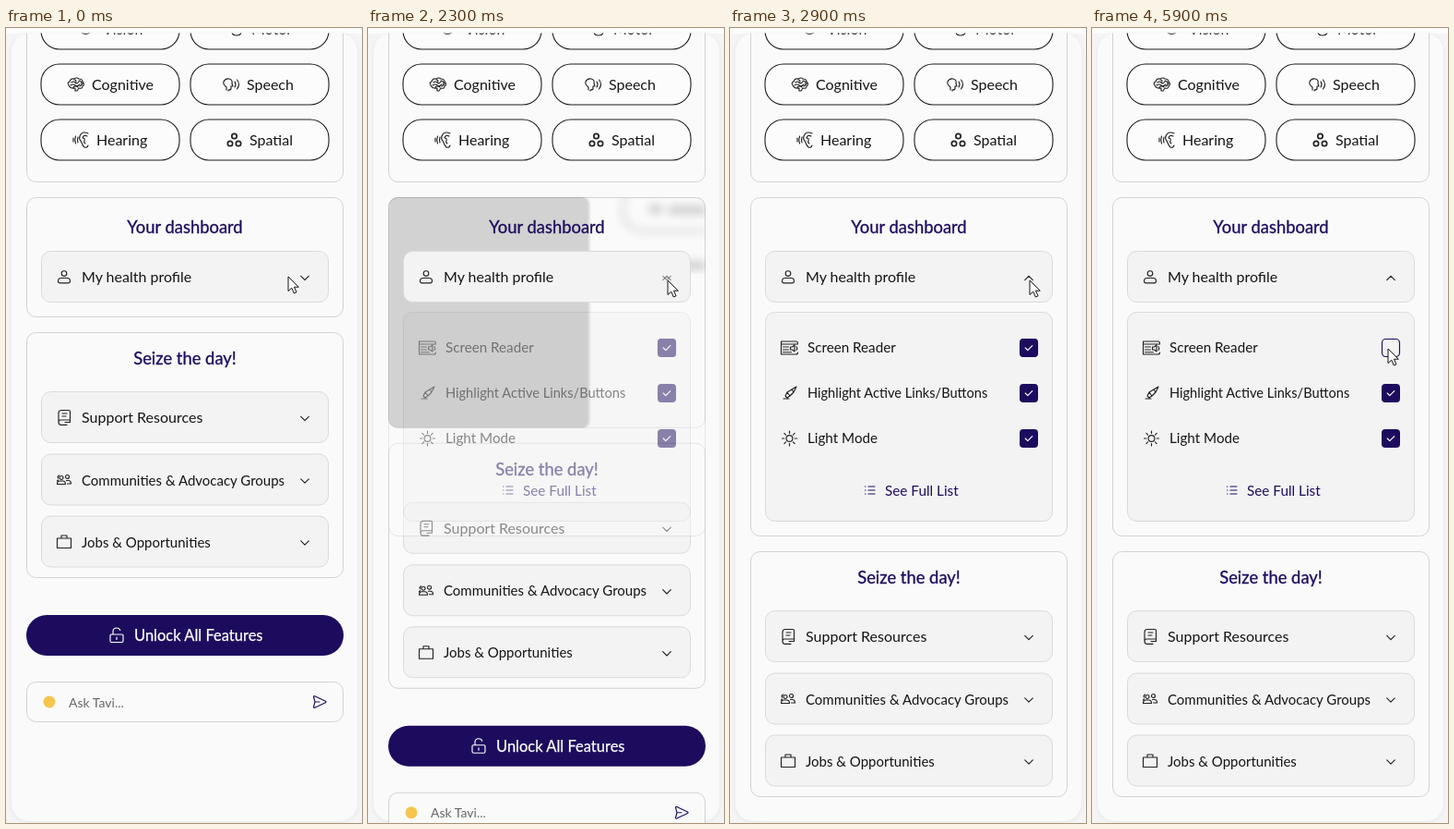
An HTML page that plays this animation: 386 by 860 pixels, repeating every 6 s.

```html
<!DOCTYPE html>
<html lang="en">
<head>
<meta charset="utf-8">
<title>Accessibility dashboard</title>
<style>
  html, body { margin: 0; width: 100%; height: 100%; overflow: hidden; background: #f5f5f5; }
  svg { display: block; font: 16px Lato, "Open Sans", sans-serif; fill: #151515; }
  .panel { fill: #fafafa; stroke: #d2d2d4; }
  .row { fill: #f3f3f3; stroke: #dadadc; }
  .pill { fill: #fcfcfc; stroke: #1c1c1c; stroke-width: 1.1; }
  .line { fill: none; stroke: #222; stroke-width: 1.15; stroke-linecap: round; stroke-linejoin: round; }
  .navy { stroke: #1d0c5e; }
  .white { stroke: #fff; }
  .title { font-size: 18.4px; text-anchor: middle; fill: #1d0c5e; stroke: #1d0c5e; stroke-width: .3; }
  .box { fill: #1d0c5e; }
  .cursor { fill: #fff; stroke: #111; stroke-width: 1; stroke-linejoin: round; }
</style>
</head>
<body>
<svg id="stage" width="386" height="860" viewBox="0 0 386 860"></svg>
<script>
const icons = {
  brain: 'M-8 1q-2-3 1-4q1-4 5-3q3-2 5 0q4 0 4 3q3 3 0 5q0 3-4 2l-2 3h-2v-3q-5 1-7-3zM-5-2q2-2 4 0t4-1M-6 1q3-2 5 0t5-1M-2-5q2 0 2 2M3-4q3 0 3 3M-3 3q2-2 5 0M4 2q2-1 3-3',
  speech: 'M-5 6v-3q-4-3-3-6q2-4 6-3q4 1 3 5l1 3h-2v3q-1 1-3 1v1M4-3q2 3 0 6M6.5-5q4 5 0 10',
  ear: 'M-8-2v4M-5.5-4q-1.5 4 0 8M-3-3q-1 3 0 6M8-7q-7-3-9 3q-1 3 1 5q2 5 4 7q3 1 4-2M7-4q-4-2-5 2q3 0 2 3q-1 2 1 3',
  user: 'M-2.8-4a2.8 2.8 0 1 0 5.6 0a2.8 2.8 0 1 0-5.6 0M-6.5 4.2q0-3.2 3.2-3.2h6.6q3.2 0 3.2 3.2q0 2.2-2.2 2.2h-8.6q-2.2 0-2.2-2.2z',
  doc: 'M-6 5V-5q0-3 3-3H5q1.5 0 1.5 1.5V2.5H-4q-2 0-2 2.5t2 2.8H3M6.5 2.5v2M-2-4.5h5M-2-1.5h4M1 5h5.5',
  group: 'M-5-2.5a2 2 0 1 0 4 0a2 2 0 1 0-4 0M1.5-3.5a2 2 0 1 0 4 0a2 2 0 1 0-4 0M-7.5 4.5q0-3.5 3-3.5h3q3 0 3 3.5zM2.5.5h2q3 0 3 3.5h-4M-5.5-5q-2 1-1 3M-7.5 1l1-1',
  bag: 'M-7.5-4h15v10.5h-15zM-3-4v-3h6v3',
  lock: 'M-6-1h12q1 0 1 1v6q0 1.5-1.5 1.5h-11q-1.5 0-1.5-1.5v-6q0-1 1-1M-4-1v-3q0-4 4-4q3 0 3.8 2.5M0 2v2.5',
  send: 'M-6.5-5.5q0-1.3 1.3-.8L6.5-.8q1 .8 0 1.6L-5.2 6.3q-1.3.5-1.3-.8L-5 0zM-5 0h5',
  down: 'M-4.3-2.1L0 2.2L4.3-2.1',
  up: 'M-4.3 2.1L0-2.2L4.3 2.1',
  reader: 'M-9-7H7q2 0 2 2M-9-7V7H7q2 0 2-2M-9-4H9M-7-1h6M-7 2h6M-7 4.7h9M1-1h2l2.5-2v7l-2.5-2h-2zM7.5-1.5q1.5 2 0 4',
  marker: 'M-7 6h6M-5 3l2-4l3 4l-3 2zM-3-1l5-3l5-3l-3 6l-4 4M2-4l2 3',
  list: 'M-2-4h7M-2 0h7M-2 4h7M-5.5-4h.4M-5.5 0h.4M-5.5 4h.4',
  check: 'M-3.8 0L-1.2 2.6L3.8-2.4'
};

const icon = (name, x, y, cls = '', attrs = '') =>
  `<path class="line ${cls}" transform="translate(${x} ${y})" d="${icons[name]}" ${attrs}/>`;
const text = (s, x, y, size = 16, attrs = '') =>
  `<text x="${x}" y="${y}" font-size="${size}" ${attrs}>${s}</text>`;
const title = (s, y) => `<text class="title" x="194" y="${y}">${s}</text>`;
const rect = (cls, x, y, w, h, r = 10, attrs = '') =>
  `<rect class="${cls}" x="${x}" y="${y}" width="${w}" height="${h}" rx="${r}" ${attrs}/>`;
const pill = (x, y) => rect('pill', x, y, 150, 44, 20);
const row = (y, name, label, size) =>
  rect('row', 38.5, y, 311, 55) + icon(name, 63, y + 28) + text(label, 82, y + 33.5, size);
const checkbox = (y, attrs = '') =>
  `<g ${attrs}>${rect('box', 314, y - 10, 20, 20, 4)}${icon('check', 324, y, 'white', 'stroke-width="1.6"')}</g>`;

const rays = [...Array(8)].map((_, i) =>
  `<path class="line" transform="translate(64.5 444) rotate(${i * 45})" d="M0-5.6v-2.4"/>`).join('');
const dots = [[247.5, 117], [243, 125], [252, 125]].map(([x, y]) =>
  `<circle class="line" cx="${x}" cy="${y}" r="2.7" style="stroke-width:1.7"/>`).join('');

const topPanel = rect('panel', 22.5, -40, 343, 206.5)
  + [-21, 39, 99].map(y => pill(38, y) + pill(200, y)).join('')
  + text('Vision', 105, 7) + text('Motor', 266, 7)
  + '<path class="line" d="M81 4q5 5 11 0M245 4q0 4 5 4t5-4"/>'
  + icon('brain', 76, 61) + text('Cognitive', 93, 67)
  + icon('speech', 244, 61) + text('Speech', 261, 67)
  + icon('ear', 81, 121) + text('Hearing', 98, 127)
  + dots + text('Spatial', 264, 127);

const lower = rect('panel', 22.5, 329.5, 343, 265) + title('Seize the day!', 364)
  + row(393.5, 'doc', 'Support Resources', 16)
  + row(461, 'group', 'Communities &amp; Advocacy Groups', 15)
  + row(528, 'bag', 'Jobs &amp; Opportunities', 15)
  + [422.5, 490, 557].map(y => icon('down', 324, y)).join('')
  + rect('box', 22, 635, 344, 44, 22) + icon('lock', 120, 657, 'white')
  + text('Unlock All Features', 139, 663, 16.5, 'fill="#fff" stroke="#fff" stroke-width=".25"')
  + rect('panel', 22.5, 707.5, 343, 43)
  + '<circle cx="47" cy="729" r="6.5" fill="#f6c64b"/>'
  + text('Ask Tavi...', 68, 734.5, 14, 'fill="#666"') + icon('send', 340, 729, 'navy');

const details = rect('panel', 22.5, 183.5, 343, 366) + rect('row', 38.5, 307.5, 311, 226)
  + icon('reader', 64.5, 346) + text('Screen Reader', 84, 351.3, 15.2)
  + icon('marker', 65, 395) + text('Highlight Active Links/Buttons', 84, 400.3, 14.6)
  + '<circle class="line" cx="64.5" cy="444" r="3.4"/>' + rays + text('Light Mode', 84, 449.3, 15.2)
  + icon('list', 152, 500, 'navy') + text('See Full List', 168, 505.5, 15.3, 'fill="#1d0c5e"')
  + rect('line navy', 314.5, 336.5, 19, 19, 4) + checkbox(346, 'id="reader"')
  + checkbox(395) + checkbox(444);

// Smear shown behind the card while it opens
const smear = rect('', 22, 183, 218, 129, 8, 'id="shade" filter="url(#edge)"')
  + '<g filter="url(#blur)" fill="none" stroke="#ccc" stroke-width="5">'
  + '<path d="M366 172h-66q-24 2-24 24t24 24h66"/>'
  + '<path d="M305 196h14M326 197h40M340 257h26" stroke="#aaa" stroke-width="10"/></g>';

stage.innerHTML = `<defs>
    <clipPath id="view"><rect y="5.5" width="386" height="855"/></clipPath>
    <clipPath id="cardClip"><rect id="cardArea" x="22" y="183" width="344" height="130" rx="10"/></clipPath>
    <filter id="blur"><feGaussianBlur stdDeviation="4"/></filter>
    <filter id="edge"><feGaussianBlur stdDeviation="1.5 0"/></filter>
    <filter id="soft"><feGaussianBlur stdDeviation="2"/></filter>
  </defs>
  <rect width="386" height="6" fill="#fcfcfc"/>
  <rect x="5" y="7" width="377" height="852" rx="19" fill="#e9e9e9" filter="url(#soft)"/>
  <rect x="6" y="6" width="375" height="852" rx="19" fill="#fafafa"/>
  <g clip-path="url(#view)">
    ${topPanel}
    ${rect('panel', 22.5, 183.5, 343, 129, 10, 'id="card"')}
    <g id="lower">${lower}</g>
    <g id="details">${details}</g>
    <g id="smear" clip-path="url(#cardClip)">${smear}</g>
    ${title('Your dashboard', 222)}${row(241.5, 'user', 'My health profile', 16)}
    ${icon('down', 324, 270.5, '', 'id="down"')}${icon('up', 324, 270.5, '', 'id="up"')}
    <path id="arrow" class="cursor" d="M0 0V15.5L3.8 12.2L6.3 18L9 16.8L6.5 11.2H11.3Z"/>
    <path id="hand" class="cursor" d="M-2 1.8a2 2 0 0 1 4 0V8l6.5 1.2q3 .8 2.8 3.8l-1 5l-1.2 5H0l-5.5-8.5q-.8-2 1-2.3q1.2 0 2.5 2zM2 8v4M5 8.8v3.5M8 9.5v3"/>
  </g>`;

const $ = id => document.getElementById(id);
const set = (id, attrs) => { for (const k in attrs) $(id).setAttribute(k, attrs[k]); };
const ease = (t, start, length) => {
  const x = Math.min(1, Math.max(0, (t - start) / length));
  return x * x * (3 - 2 * x);
};

function draw(now) {
  const t = now % 6000;
  const open = ease(t, 2160, 280), shift = 237 * open;
  set('card', { height: 129 + shift, opacity: open < 1 ? 1 : 0 });
  set('cardArea', { height: 130 + shift });
  set('shade', { height: 130 + shift, opacity: .35 * (1 - open) });
  set('smear', { opacity: open > 0 && open < 1 ? 1 - open : 0 });
  set('shade', { opacity: .35 });
  set('lower', { transform: `translate(0 ${shift})` });
  set('details', { opacity: open });
  set('down', { opacity: 1 - open });
  set('up', { opacity: open });
  set('reader', { opacity: 1 - ease(t, 5420, 280) });

  const first = ease(t, 0, 450), second = ease(t, 3500, 320), click = t >= 5250;
  const x = 306 + 19 * first - 5 * second + (click ? 1 : 0);
  const y = 269 + 4 * first + 68 * second + (click ? 6 : 0);
  const pointing = (t >= 450 && t < 2000) || (t >= 3820 && !click);
  set('arrow', { transform: `translate(${x} ${y})`, opacity: pointing ? 0 : 1 });
  set('hand', { transform: `translate(${x} ${y})`, opacity: pointing ? 1 : 0 });
  requestAnimationFrame(draw);
}
draw(0);
</script>
</body>
</html>
```
